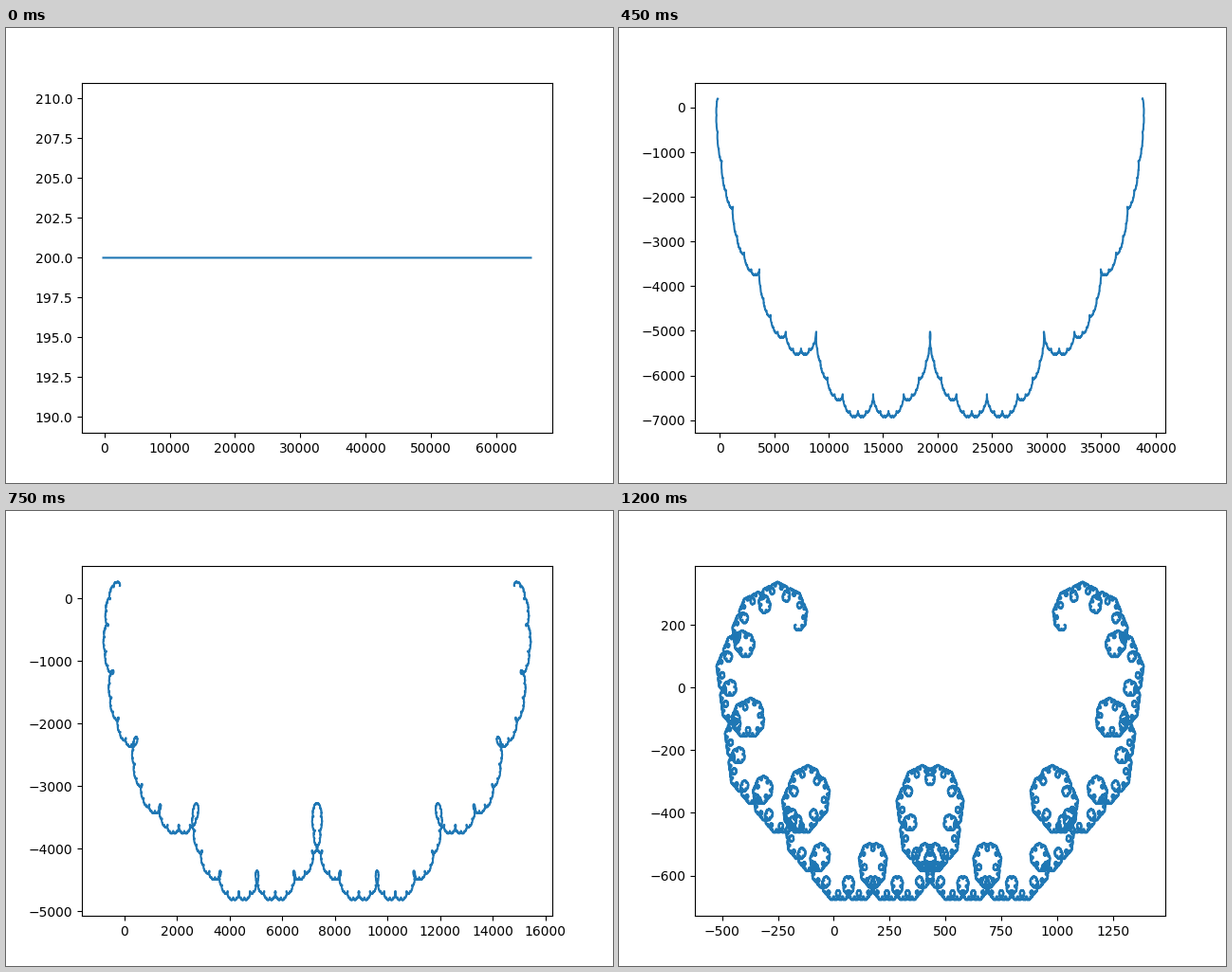
Write a matplotlib script that moves like this. It is 640x480 px and loops after 1.35 s.

```python
import numpy as np
import matplotlib.pyplot as plt
from matplotlib.animation import FuncAnimation

ORDER = 15
STEP = 2
START = (-170, 200)
TURN = 5          # degrees added per frame
FRAMES = 9

# Number of set bits of each segment index gives its heading
bits = np.zeros(1, dtype=int)
for _ in range(ORDER):
    bits = np.concatenate([bits, bits + 1])


def levy_curve(angle):
    """Vertices of a C curve whose chord is horizontal and which sags downwards."""
    heading = angle * (2 * bits - ORDER)
    x = START[0] + STEP * np.cumsum(np.cos(heading))
    y = START[1] + STEP * np.cumsum(np.sin(heading))
    return np.r_[START[0], x], np.r_[START[1], y]


fig, ax = plt.subplots(figsize=(6.4, 4.8), dpi=100)


def draw(i):
    ax.clear()
    return ax.plot(*levy_curve(np.radians(TURN * i)))


anim = FuncAnimation(fig, draw, frames=FRAMES, interval=150,
                     repeat=True, repeat_delay=0)
plt.show()
```
